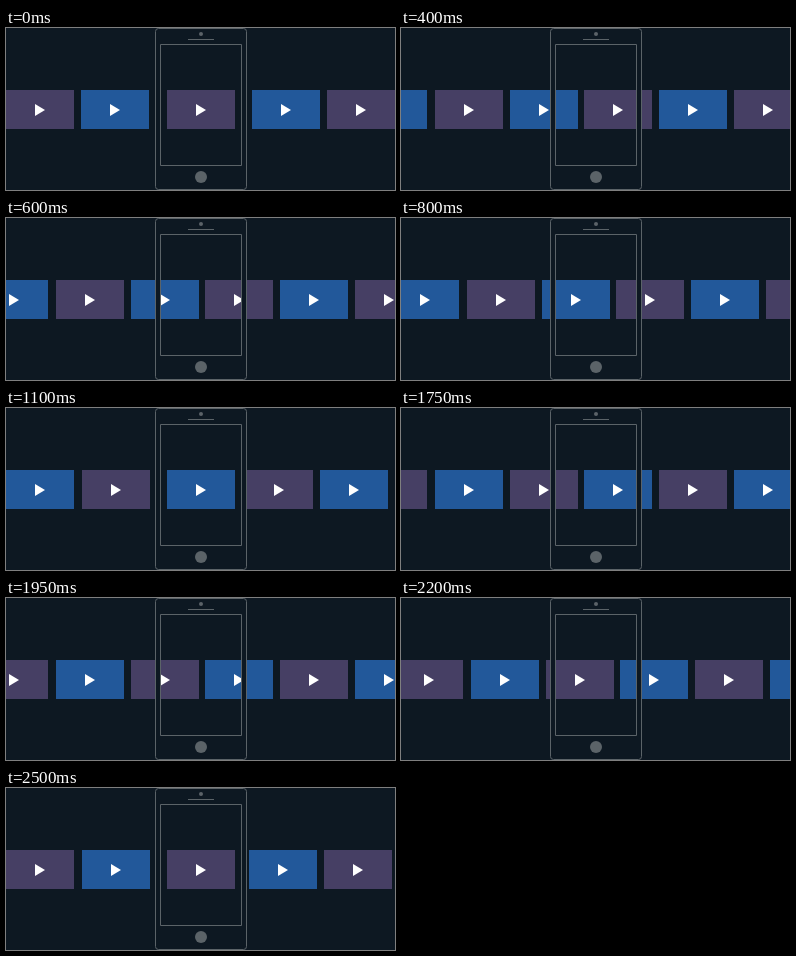
Animation of 389x162 px, one loop 2600 ms. Source, as an HTML page with a canvas:

```html
<!DOCTYPE html>
<html lang="en">
<head>
<meta charset="utf-8">
<title>Video carousel</title>
<style>
  html, body { margin: 0; width: 100%; height: 100%; overflow: hidden; background: #0d1822; }
  canvas { display: block; width: 389px; height: 162px; }
</style>
</head>
<body>
<canvas id="stage" width="389" height="162"></canvas>
<script>
const ctx = document.getElementById('stage').getContext('2d');
const BG = '#0d1822', LINE = '#5b6368', PURPLE = '#463f64', BLUE = '#22589a';
const LOOP = 2600, HALF = 1350, TICK = 50;
const CARD = { y: 62, w: 68, h: 39 };

// Distance travelled by the pushing card after s ticks
function travel(s) {
  return 4 * s + 2 * Math.min(1, Math.max(0, (s - 4) / 4));
}

// Each card waits at its place until its left neighbour pushes it
function layout(s) {
  const p = travel(s);
  const first = Math.min(p, 76);
  const second = Math.min(75 + p, 161);
  const middle = Math.min(Math.max(161, 149 + p), 246);
  const right = Math.min(Math.max(246, 224 + p), 321);
  return [first - 76, first, second, middle, right, right + 75];
}

function drawCard(x, color) {
  ctx.fillStyle = color;
  ctx.fillRect(x, CARD.y, CARD.w, CARD.h);
  ctx.fillStyle = '#fff';
  ctx.beginPath();
  ctx.moveTo(x + 29, 76);
  ctx.lineTo(x + 39, 82);
  ctx.lineTo(x + 29, 88);
  ctx.fill();
}

function disc(x, y, r) {
  ctx.beginPath();
  ctx.arc(x, y, r, 0, Math.PI * 2);
  ctx.fill();
}

function drawPhone() {
  // Frame with an open screen
  ctx.fillStyle = BG;
  ctx.beginPath();
  ctx.roundRect(149.5, 0.5, 91, 161, 3);
  ctx.rect(154.5, 16.5, 81, 121);
  ctx.fill('evenodd');
  ctx.strokeStyle = LINE;
  ctx.lineWidth = 1;
  ctx.stroke();

  ctx.fillStyle = LINE;
  ctx.fillRect(182, 11, 26, 1);
  disc(195, 6, 2);
  disc(195, 149, 6);
}

function draw(now) {
  const t = now % LOOP;
  const second = t >= HALF;
  const s = second
    ? Math.min(23, Math.floor((t - HALF) / TICK))
    : Math.min(24, Math.floor(t / TICK));

  ctx.fillStyle = BG;
  ctx.fillRect(0, 0, 389, 162);
  layout(s).forEach((x, i) => {
    drawCard(Math.round(x), (i % 2 === 1) !== second ? PURPLE : BLUE);
  });
  drawPhone();
}

const start = performance.now();
function frame() {
  draw(performance.now() - start);
  requestAnimationFrame(frame);
}
frame();
</script>
</body>
</html>
```
